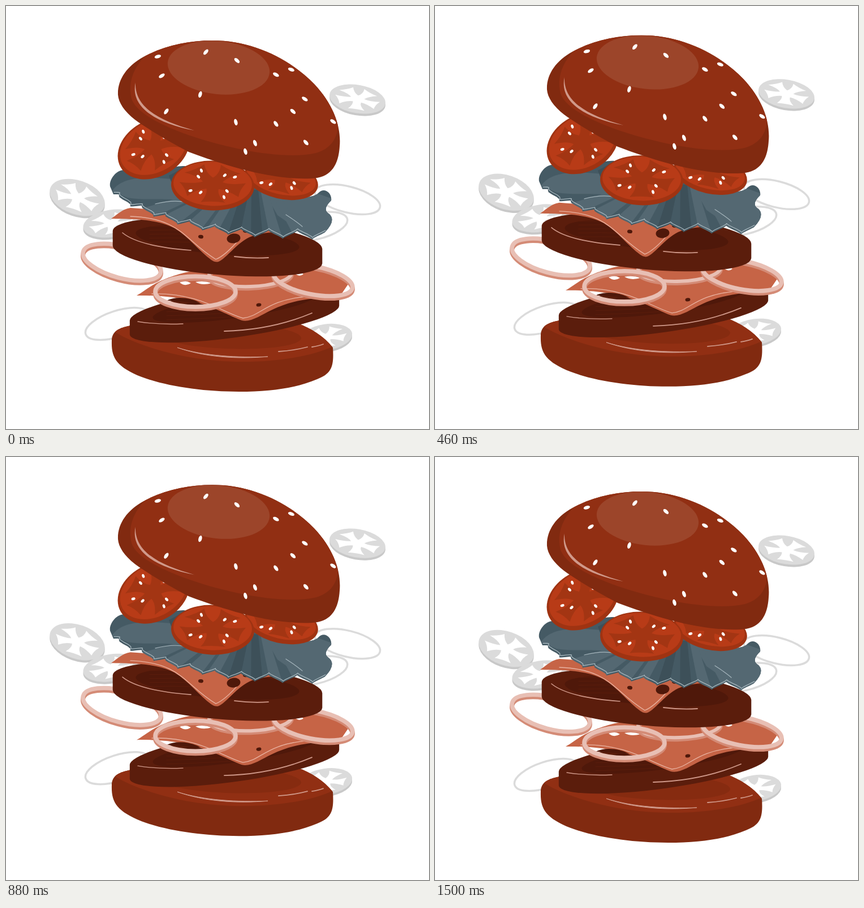
These frames come from a looping animation (748 px wide and 748 px high, 1.54 s). An HTML page:

```html
<!DOCTYPE html>
<html lang="en">
<head>
<meta charset="utf-8">
<title>Floating burger</title>
<style>
  html, body { margin: 0; width: 100%; height: 100%; overflow: hidden; background: #fff; }
  svg { display: block; width: 100vw; height: 100vh; }
</style>
</head>
<body>
<svg viewBox="0 0 748 748"><g id="burger"></g></svg>
<script>
const C = {
  crust: '#812a10', bun: '#912f13', glow: '#9c452a', well: '#862b10', shine: '#d0998a',
  meat: '#5b1d0c', sear: '#4f180a', cheese: '#c66446', cheeseLine: '#e9b3a2',
  leaf: '#455a64', leafLight: '#546872', leafDark: '#3d5059', leafLine: '#a4b4bb',
  rim: '#9f3312', flesh: '#b83b17', core: '#a33513',
  onion: '#e8bfb4', onionShade: '#d48b76', grey: '#dbdbdb', greyShade: '#c8c8c8'
};
const { PI, sin, cos } = Math;
const out = [];
const add = s => out.push(s);

const path = (d, fill, more = '') => add(`<path d="${d}" fill="${fill}" ${more}/>`);
const line = (d, color, w = 1.3) =>
  path(d, 'none', `stroke="${color}" stroke-width="${w}" stroke-linecap="round" stroke-linejoin="round"`);
const oval = (x, y, rx, ry, rot, fill, more = '') =>
  add(`<ellipse rx="${rx}" ry="${ry}" transform="translate(${x} ${y}) rotate(${rot})" fill="${fill}" ${more}/>`);
const hoop = (x, y, rx, ry, rot, color, w) =>
  oval(x, y, rx, ry, rot, 'none', `stroke="${color}" stroke-width="${w}"`);
const clipped = (id, d, draw) => {
  add(`<clipPath id="${id}"><path d="${d}"/></clipPath><g clip-path="url(#${id})">`);
  draw();
  add('</g>');
};

// Five arms widening towards the edge of a slice
function arms(x, y, rx, ry, rot, color) {
  let d = '';
  for (let i = 0; i < 5; i++) {
    const pt = (r, off) => {
      const a = (i * 72 - 54 + off) * PI / 180;
      return `${(r * cos(a)).toFixed(3)} ${(r * sin(a)).toFixed(3)}`;
    };
    d += `M0 0L${pt(.25, -36)}Q${pt(.45, -14)} ${pt(.8, -23)}Q${pt(.68, 0)} ${pt(.8, 20)}Q${pt(.45, 14)} ${pt(.25, 36)}Z`;
  }
  path(d, color, `transform="translate(${x} ${y}) rotate(${rot}) scale(${rx} ${ry})"`);
}

function greySlice(x, y, rx, ry, rot) {
  oval(x, y + 2, rx, ry, rot, C.greyShade);
  oval(x, y - 2, rx, ry, rot, C.grey);
  arms(x, y - 2, rx, ry, rot, '#fff');
}

const greyRing = (x, y, rot) => hoop(x, y, 59, 23, rot, C.grey, 3.5);

function onion(x, y, ry, rot) {
  hoop(x, y + 4, 71, ry, rot, C.onionShade, 8);
  hoop(x, y, 71, ry, rot, C.onion, 7.5);
}

function tomato(x, y, rx, ry, rot) {
  oval(x, y, rx, ry, rot, C.rim);
  oval(x, y - 3, rx - 4, ry - 5, rot, C.flesh);
  arms(x, y - 3, rx, ry, rot, C.core);
  for (let i = 0; i < 8; i++) {
    const a = (i >> 1) * PI / 2 + .7 + (i % 2 ? .4 : 0), r = i % 2 ? .6 : .45;
    oval(x + rx * r * cos(a), y - 3 + ry * r * sin(a), 3.6, 2.3, a * 57 + 10, '#fff');
  }
}

// Tilted disc with straight sides
function slab(x, y, rx, ry, rot, depth) {
  const a = rot * PI / 180, dx = rx * cos(a), dy = rx * sin(a);
  const arc = (ex, ey) => `A${rx} ${ry} ${rot} 0 1 ${ex} ${ey}`;
  return `M${x - dx} ${y - dy}${arc(x + dx, y + dy)}v${depth}${arc(x - dx, y - dy + depth)}Z`;
}

function patty(x, y, rx, ry, rot, depth) {
  path(slab(x, y, rx, ry, rot, depth), C.meat);
  oval(x, y, rx * .78, ry * .68, rot, C.sear);
  for (let i = -2; i <= 2; i++)
    line(`M${x - 120} ${y + i * 7 - 120 * sin(rot / 57)}q80 -2 150 ${rot}`, C.meat, 1);
}

// Loose greys behind the stack
greySlice(621.5, 166.5, 50, 25, 10);
greySlice(126, 340.5, 50.5, 30, 19);
greySlice(186, 386.5, 50, 24, -9);
greySlice(566, 587.5, 46.5, 23, -8);
greyRing(604, 342, 14);
greyRing(546, 390, -13);
greyRing(197, 562, -18);

// Lower bun
const base = 'M187 592C187 578 196 571 212 567C300 545 440 545 515 561C540 570 562 584 578 604' +
  'C580 636 577 650 550 660C515 675 470 682 412 682C350 682 285 673 240 656C195 638 186 622 187 592Z';
path(base, C.crust);
clipped('base', base, () => {
  path('M192 576C225 597 310 629 420 629C490 629 546 617 578 602V540H180Z', C.bun);
  oval(394, 583, 128, 23, 2, C.well);
});
path('M303 604C350 619 410 622 463 620C410 625 350 621 303 604Z', C.shine, `stroke="${C.shine}"`);
line('M482 611Q510 609 533 603M541 603Q553 601 561 598', C.shine, 1.8);

// Lower patty
patty(404, 531, 187, 31, -8, 24);
line('M233 558Q270 564 313 562', C.shine);
line('M386 575Q470 573 541 543', C.shine, 1.8);

// Lower cheese with onions
path('M231 512C248 503 262 485 318 471L400 455L535 462C570 469 590 480 605 492L590 514' +
  'C530 516 500 523 471 537C450 547 432 560 417 556C380 543 340 510 231 512Z', C.cheese);
path('M284 521C300 513 325 515 344 525Z', C.sear);
line('M258 509C340 506 385 543 419 552C450 549 460 520 530 514', C.cheeseLine);
oval(447, 528.5, 4.5, 3, -8, C.sear);
path('M307 489q10 -5 20 1q-10 7 -20 -1ZM335 488q15 -3 29 2q-18 5 -29 -2ZM511 473q9 -5 15 1q-7 6 -15 -1Z', '#fff');
hoop(432, 477, 73, 22, -2, C.onionShade, 8);
hoop(432, 474, 73, 22, -2, C.onion, 6);
onion(205, 453, 28, 15);
onion(543, 485, 25, 11);

// Upper patty
patty(374, 414, 186, 36, 5, 25);
line('M206 401Q235 425 327 432', C.shine, 1.6);
line('M404 443Q435 447 464 445', C.shine, 1.8);
onion(335, 505, 27, 0);

// Upper cheese
path('M186 376C198 368 204 360 220 357L400 370L562 395L557 398C505 398 455 397 430 409' +
  'C405 422 390 446 376 452Q370 454 363 449C342 434 323 408 298 393C265 376 225 377 186 376Z', C.cheese);
line('M220 372C310 375 315 414 371 448Q387 442 413 412', C.cheeseLine);
oval(344.5, 408, 4.5, 3.2, 5, C.sear);
oval(402.5, 411, 12, 8.5, -8, C.sear);
oval(424, 398, 5, 3, 0, C.sear);

// Lettuce: a falling curve with ruffles that widen to the right
function frill(u) {
  const wave = 2 * PI * (9.4 * u - .75 - 1.3 * u * u);
  return [
    (190 + 370 * u - 4 * sin(2 * wave)).toFixed(1),
    (333 + 72 * (1 - (1 - u) ** 3) + (4 + 4 * u) * cos(wave)).toFixed(1)
  ];
}
const hem = Array.from({ length: 101 }, (_, i) => frill(i / 100)).join('L');
const leaf = `M184 319L${hem}Q584 380 572 368Q558 360 575 344` +
  'C577 331 563 320 553 330C543 341 520 338 500 338L316 283C294 282 278 292 258 294C235 296 217 293 209 290C196 289 182 306 184 319Z';
path(leaf, C.leaf);
clipped('leaf', leaf, () => {
  path('M188 327C205 301 248 301 304 307L338 347C285 337 245 345 215 339Z', C.leafLight);
  path('M455 326L555 333L585 344V390L545 415L480 370Z', C.leafLight);
  path('M288 300L320 283L352 300L330 349Q300 337 288 300Z', C.leafDark);
  for (let i = 0; i < 8; i++) {
    const u = .15 + i * .1, x = 330 + 160 * u;
    path(`M${x} 325L${frill(u)}L${frill(u + .06)}L${x + 12} 325Z`, i === 4 || i === 5 ? C.leafDark : C.leafLight);
  }
  add('<g transform="translate(1 -3.5)">');
  line(`M${hem}`, C.leafLine);
  add('</g>');
  line('M264 350Q295 342 319 347M495 369Q515 382 524 390', C.leafLine, 1.2);
});

// Tomatoes
tomato(487, 306, 66, 35, 13);
tomato(261, 252, 67, 50, -29);
tomato(365.5, 317.5, 73.5, 44, 2);

// Upper bun
const dome = 'M198 157C197 130 214 106 243 90C280 70 322 61 365 61C435 61 500 92 545 138' +
  'C580 175 593 215 590 248C588 282 574 304 540 305C470 308 390 283 323 258C285 238 250 217 228 201' +
  'C209 186 199 171 198 157Z';
path(dome, C.crust);
clipped('dome', dome, () => {
  path('M248 86C222 112 216 140 222 164C232 195 300 222 350 237C420 258 500 271 548 260C575 252 587 234 588 205L610 40H248Z', C.bun);
  oval(376, 109, 90.5, 47, 6, C.glow);
});
path('M229 135C227 180 272 203 333 220C268 208 219 180 229 135Z', C.shine);

// Sesame points away from the crown
const sesame = '268,89 353,81 408,96 275,123 343,156 283,186 406,205 440,242 ' +
  '423,257 477,121 504,112 528,164 507,186 477,208 530,241 578,204';
for (const dot of sesame.split(' ')) {
  const [x, y] = dot.split(',').map(Number);
  oval(x + .4, y + .4, 5.8, 3, Math.atan2(y - 61, x - 370) * 180 / PI, '#fff');
}

const burger = document.getElementById('burger');
burger.innerHTML = out.join('');

// Eased rise and nearly even fall, held at 24 pictures a second
const LOOP = 1540, HALF = 750, STEP = 1000 / 24, HEIGHT = 14.4;

function lift(t) {
  const p = Math.max(0, 1 - Math.abs(t - HALF) / HALF);
  return HEIGHT * (t < HALF ? p - .04 * sin(2 * PI * p) : p ** 1.08);
}

const start = performance.now();
function tick(now) {
  const t = Math.max(0, now - start) % LOOP;
  const held = Math.floor((t + 2) / STEP) * STEP;
  burger.setAttribute('transform', `translate(0 ${-lift(held).toFixed(2)})`);
  requestAnimationFrame(tick);
}
tick(start);
</script>
</body>
</html>
```
